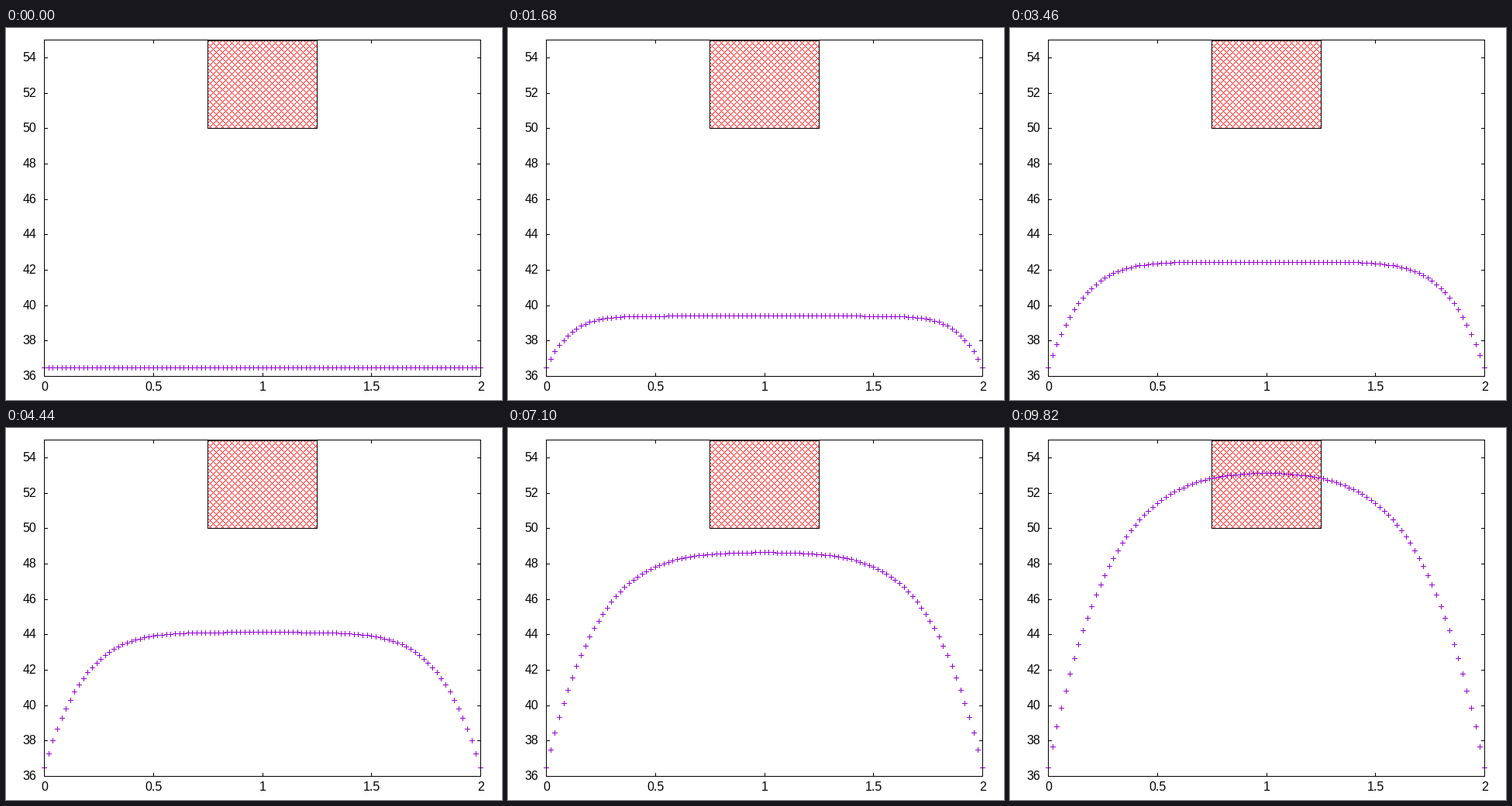
Write a matplotlib script that moves like this. It is 640 by 480 pixels and loops after 9840 ms.

```python
import numpy as np
import matplotlib.pyplot as plt
from matplotlib.animation import FuncAnimation
from matplotlib.patches import PathPatch
from matplotlib.path import Path

plt.rcParams["font.family"] = "Liberation Sans"
plt.rcParams["text.hinting"] = "default"

W, H, DPI = 640, 480, 100
LEFT, RIGHT, TOP, BOTTOM = 49, 612, 15, 449
X_MAX, Y_MIN, Y_MAX = 2, 36, 55
FRAMES, INTERVAL = 492, 20

# Heated rod with both ends held at a fixed temperature
NODES = 101
T_EDGE = 36.5
HEATING = 0.034507
COOLING = 3.86e-5
DIFFUSION = 0.498


def px(x):
    return np.floor(LEFT + np.asarray(x) * (RIGHT - LEFT) / X_MAX + 0.5)


def py(y):
    rise = (np.asarray(y) - Y_MIN) * (BOTTOM - TOP) / (Y_MAX - Y_MIN)
    return BOTTOM - np.floor(rise + 0.5)


def boxes(rects):
    """Path of filled pixel boxes given as inclusive x0, y0, x1, y1."""
    x0, y0, x1, y1 = np.asarray(rects, float).T
    x0, y0, x1, y1 = x0 - 0.5, y0 - 0.5, x1 + 0.5, y1 + 0.5
    verts = np.stack([x0, y0, x1, y0, x1, y1, x0, y1, x0, y0], axis=1)
    codes = [Path.MOVETO] + [Path.LINETO] * 3 + [Path.CLOSEPOLY]
    return Path(verts.reshape(-1, 2), codes * len(verts))


def outline(x0, y0, x1, y1):
    return boxes([(x0, y0, x1, y0), (x0, y1, x1, y1),
                  (x0, y0, x0, y1), (x1, y0, x1, y1)])


def pluses(xs, ys, r=3):
    across = np.stack([xs - r, ys, xs + r, ys], axis=1)
    down = np.stack([xs, ys - r, xs, ys + r], axis=1)
    return boxes(np.concatenate([across, down]))


def add(path, color, zorder):
    patch = PathPatch(path, facecolor=color, linewidth=0, antialiased=False,
                      snap=False, zorder=zorder)
    ax.add_patch(patch)
    return patch


def simulate():
    temp = np.full(NODES, T_EDGE)
    states = [temp]
    for _ in range(FRAMES - 1):
        flow = temp[2:] - 2 * temp[1:-1] + temp[:-2]
        loss = COOLING * (temp[1:-1] - T_EDGE)
        temp = temp.copy()
        temp[1:-1] += HEATING - loss + DIFFUSION * flow
        states.append(temp)
    return states


fig = plt.figure(figsize=(W / DPI, H / DPI), dpi=DPI, facecolor="white")
ax = fig.add_axes([0, 0, 1, 1])
ax.set_axis_off()

# Ticks and labels
ticks = []
font = dict(fontsize=16 * 72 / DPI, color="black", va="baseline")
for value in range(36, 56, 2):
    y = float(py(value))
    ticks += [(LEFT, y, LEFT + 4, y), (RIGHT - 4, y, RIGHT, y)]
    ax.text(39, y + 4.5, str(value), ha="right", **font)
for value in (0, 0.5, 1, 1.5, 2):
    x = float(px(value))
    ticks += [(x, BOTTOM - 4, x, BOTTOM), (x, TOP, x, TOP + 4)]
    ax.text(x, 467.5, f"{value:g}", ha="center", **font)
add(boxes(ticks), "black", 1)

# Cross-hatched target zone
x0, x1, y0, y1 = int(px(0.75)), int(px(1.25)), TOP + 1, int(py(50))
gy, gx = np.mgrid[y0:y1 + 1, x0:x1 + 1]
lines = ((gx - gy) % 8 == 0) | ((gx + gy) % 8 == 6)
hatch = np.full(lines.shape + (3,), 255, np.uint8)
hatch[lines] = (255, 0, 0)
ax.imshow(hatch, extent=(x0 - 0.5, x1 + 0.5, y1 + 0.5, y0 - 0.5),
          interpolation="nearest", aspect="auto", zorder=2)
add(outline(x0, y0, x1, y1), "black", 3)

# Temperature curve below the frame line
states = simulate()
node_x = px(np.linspace(0, X_MAX, NODES))
curve = add(pluses(node_x, py(states[0])), "#9400d3", 4)
add(outline(LEFT, TOP, RIGHT, BOTTOM), "black", 5)

ax.set_xlim(-0.5, W - 0.5)
ax.set_ylim(H - 0.5, -0.5)


def update(i):
    curve.set_path(pluses(node_x, py(states[i])))
    return [curve]


anim = FuncAnimation(fig, update, frames=FRAMES, interval=INTERVAL,
                     repeat=True, repeat_delay=0, blit=False)
plt.show()
```
